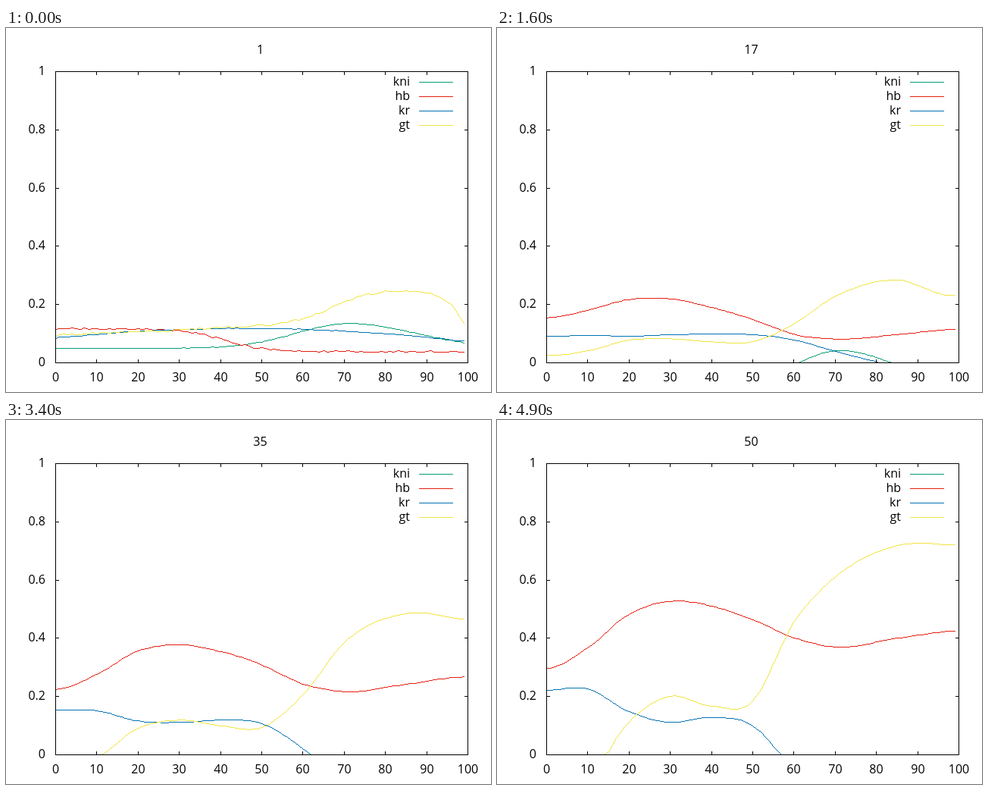
An HTML page that plays this animation: 640 px wide and 480 px high, repeating every 5000 ms.

```html
<!DOCTYPE html>
<html lang="en">
<head>
<meta charset="utf-8">
<title>Four curves</title>
<style>
  html, body { margin: 0; width: 100%; height: 100%; overflow: hidden; background: #fff; }
  svg { display: block; width: 640px; height: 480px; }
  path { fill: none; stroke-width: 1; shape-rendering: crispEdges; }
  text { font: 16px "Open Sans", "Noto Sans", sans-serif; fill: #000; }
  .mid { text-anchor: middle; }
  .end { text-anchor: end; }
</style>
</head>
<body>
<svg id="chart" viewBox="0 0 640 480"></svg>
<script>
const chart = document.getElementById('chart');
const STEP = 100, COUNT = 50;
const LEFT = 65, RIGHT = 609, TOP = 57, BOTTOM = 441;

const sigmoid = z => 1 / (1 + Math.exp(-z));
const bell = z => Math.exp(-z * z);

// Heights are in thousandths. A series either has its own rule, or a start
// curve that passes through a few poses, each given at the knots.
const knots = [0, 10, 20, 30, 40, 50, 60, 70, 85, 100];
const series = [
  { name: 'kni', color: '#009e73', noise: 0.8,
    rule(x, n) {
      const t = n - 1;
      const hill = bell((x - 71) / (x < 71 ? 18 : 23));
      return 50 - 4.1 * t - 0.42 * t * t + (85 + 5 * t) * hill;
    } },
  { name: 'hb', color: '#e51e10', noise: 3,
    start: x => 38 + 79 * sigmoid((41 - x) / 5),
    keys: [1, 13, 50],
    poses: [
      [143, 163, 190, 189, 160, 120, 77, 64, 76, 91],
      [297, 368, 483, 527, 511, 464, 402, 370, 400, 425]
    ] },
  { name: 'kr', color: '#0072b2', noise: 1,
    start: x => 118 - 33 * ((x - 46) / 46) ** 2,
    keys: [1, 13, 35, 50],
    poses: [
      [84, 90, 91, 97, 99, 98, 89, 63, 23, 12],
      [153, 151, 116, 111, 119, 107, 22, -90, -170, -190],
      [221, 226, 148, 111, 128, 100, -50, -150, -200, -200]
    ] },
  { name: 'gt', color: '#f0e442', noise: 3.5,
    start: x => 95 + 0.6 * x + 110 * sigmoid((x - 67) / 5) - 130 * Math.exp((x - 99) / 4.3),
    keys: [1, 13, 35, 50],
    poses: [
      [44, 54, 81, 84, 77, 80, 134, 212, 261, 197],
      [-60, -12, 91, 119, 100, 94, 206, 385, 485, 465],
      [-100, -84, 113, 201, 167, 185, 455, 610, 718, 720]
    ] }
];

// Cubic curve through the points, with flat or free ends.
function spline(xs, ys, x, flat) {
  const last = xs.length - 1;
  const gap = i => xs[i + 1] - xs[i];
  const rise = i => (ys[i + 1] - ys[i]) / gap(i);
  const inner = i => (gap(i) * rise(i - 1) + gap(i - 1) * rise(i)) / (gap(i - 1) + gap(i));
  const slope = i => {
    if (i > 0 && i < last) return inner(i);
    if (flat) return 0;
    return i ? 1.5 * rise(last - 1) - 0.5 * inner(last - 1) : 1.5 * rise(0) - 0.5 * inner(1);
  };
  let i = 0;
  while (i < last - 1 && x > xs[i + 1]) i++;
  const h = gap(i), u = (x - xs[i]) / h, w = 1 - u;
  return w * w * (1 + 2 * u) * ys[i] + u * u * (3 - 2 * u) * ys[i + 1]
    + h * u * w * (w * slope(i) - u * slope(i + 1));
}

function random(seed) {
  return () => (seed = seed * 16807 % 2147483647) / 2147483647;
}

function height(s, x, n) {
  if (s.rule) return s.rule(x, n);
  const stops = [s.start(x), ...s.poses.map(pose => spline(knots, pose, x, true))];
  return spline(s.keys, stops, n, false);
}

const toX = v => Math.round(LEFT + (RIGHT - LEFT) * v / 100);
const toY = v => Math.round(BOTTOM - (BOTTOM - TOP) * Math.max(0, v) / 1000);

// A line of whole pixels from one point to the next.
function pixels([x0, y0], [x1, y1]) {
  const count = Math.max(Math.abs(x1 - x0), Math.abs(y1 - y0));
  let d = '';
  for (let i = 0; i <= count; i++) {
    const x = Math.round(x0 + (x1 - x0) * i / count);
    const y = Math.round(y0 + (y1 - y0) * i / count);
    d += `M${x} ${y + 0.5}h1`;
  }
  return d;
}

function curve(s, n) {
  const rough = s.noise * Math.exp((1 - n) / 1.5);
  const points = s.jitter.map((j, x) => [toX(x), toY(height(s, x, n) + rough * j)]);
  return points.slice(1).map((p, i) => pixels(points[i], p)).join('');
}

function add(tag, attrs, text = '') {
  const el = document.createElementNS('http://www.w3.org/2000/svg', tag);
  for (const name in attrs) el.setAttribute(name, attrs[name]);
  el.textContent = text;
  return chart.appendChild(el);
}

const label = (x, y, cls, text) => add('text', { x, y, class: cls }, text);

series.forEach((s, i) => {
  const rand = random(4021 + 977 * i);
  s.jitter = Array.from({ length: 100 }, () => 2 * rand() - 1);
  s.path = add('path', { stroke: s.color });
  const y = 71 + 19 * i;
  label(533, y + 5, 'end', s.name);
  add('path', { stroke: s.color, d: `M545 ${y + 0.5}h45` });
});

let axes = `M${LEFT + 0.5} ${TOP + 0.5}H${RIGHT + 0.5}V${BOTTOM + 0.5}H${LEFT + 0.5}Z`;
for (let v = 0; v <= 100; v += 10) {
  const x = toX(v) + 0.5;
  axes += `M${x} ${TOP}v5M${x} ${BOTTOM + 1}v-5`;
  label(x, 466, 'mid', v);
}
for (let v = 0; v <= 10; v += 2) {
  const y = toY(v * 100) + 0.5;
  axes += `M${LEFT} ${y}h5M${RIGHT + 1} ${y}h-5`;
  label(52, y + 4.5, 'end', v / 10);
}
add('path', { stroke: '#000', d: axes });
const title = label(335.5, 34, 'mid', '');

let shown = 0;
function draw(now) {
  const n = Math.floor(now / STEP) % COUNT + 1;
  if (n === shown) return;
  shown = n;
  title.textContent = n;
  for (const s of series) s.path.setAttribute('d', curve(s, n));
}

const start = performance.now();
function tick() {
  draw(performance.now() - start);
  requestAnimationFrame(tick);
}
tick();
</script>
</body>
</html>
```
